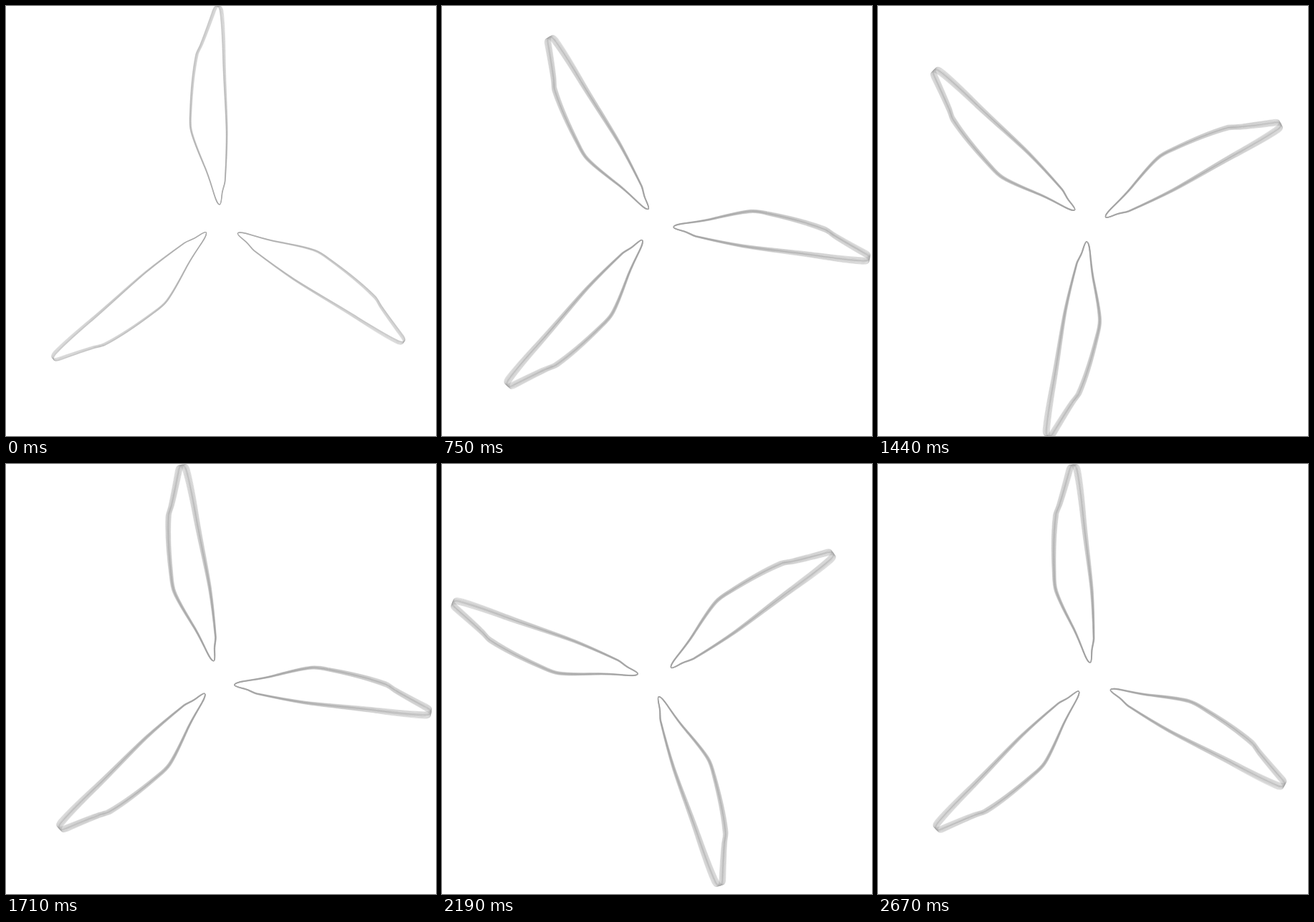
An HTML page for the animation above (2.7 s loop, 600 by 600 pixels).

```html
<!DOCTYPE html>
<html lang="en">
<head>
<meta charset="utf-8">
<title>Rotor</title>
<style>
  html, body { margin: 0; width: 100%; height: 100%; overflow: hidden; background: #fff; }
  svg { display: block; width: 100vw; height: 100vh; }
</style>
</head>
<body>
<svg id="stage" viewBox="0 0 600 600">
  <defs>
    <path id="blade" fill="none" stroke="#a2a2a2" stroke-width="1.1" stroke-opacity=".32" stroke-linejoin="round"
      d="M-3-277C0-277 2-272 2.5-266C5-245 5.5-220 6-200C7-165 10-125 10.2-100
         C10.3-75 9-50 8-33C7.5-27 5-23 4-16C3-9 3 0 .5 0C-3 0-6-10-9-20
         C-13-33-17-45-21.5-55C-26-66-36-88-39.5-103C-41-109-41-118-40.5-126
         C-39.5-155-37-185-32-209C-31-214-27-219-25-225C-19-240-13-257-8-271
         C-6.5-275-5-277-3-277Z"/>
    <g id="rotor">
      <use href="#blade" transform="translate(297.5 277)"/>
      <use href="#blade" transform="translate(323.7 316.6) rotate(123.7)"/>
      <use href="#blade" transform="translate(279.5 316.3) rotate(230.9)"/>
    </g>
  </defs>
</svg>
<script>
  const LOOP = 2700, STEP = 30, SAMPLES = 16;
  const HUB = "297.3 303.3";
  const DEG_PER_STEP = 360 * STEP / LOOP;
  const HALF_SHUTTER = DEG_PER_STEP / 4;
  const START = -0.25;

  // Overlaid copies across the open shutter make the motion blur, densest in the middle.
  const stage = document.getElementById("stage");
  const copies = Array.from({ length: SAMPLES }, (_, i) => {
    const node = document.createElementNS("http://www.w3.org/2000/svg", "use");
    node.setAttribute("href", "#rotor");
    stage.appendChild(node);
    const u = (2 * i + 1) / SAMPLES - 1;
    return { node, offset: Math.sign(u) * Math.abs(u) ** 1.4 * HALF_SHUTTER };
  });

  function draw(ms) {
    const turn = Math.floor((ms % LOOP) / STEP) * DEG_PER_STEP;
    for (const { node, offset } of copies) {
      const angle = turn + offset;
      // Nothing is exposed before the loop begins.
      node.setAttribute("visibility", angle < 0 ? "hidden" : "visible");
      node.setAttribute("transform", `rotate(${START + angle} ${HUB})`);
    }
  }

  const begin = performance.now();
  function tick() {
    draw(performance.now() - begin);
    requestAnimationFrame(tick);
  }
  draw(0);
  requestAnimationFrame(tick);
</script>
</body>
</html>
```
